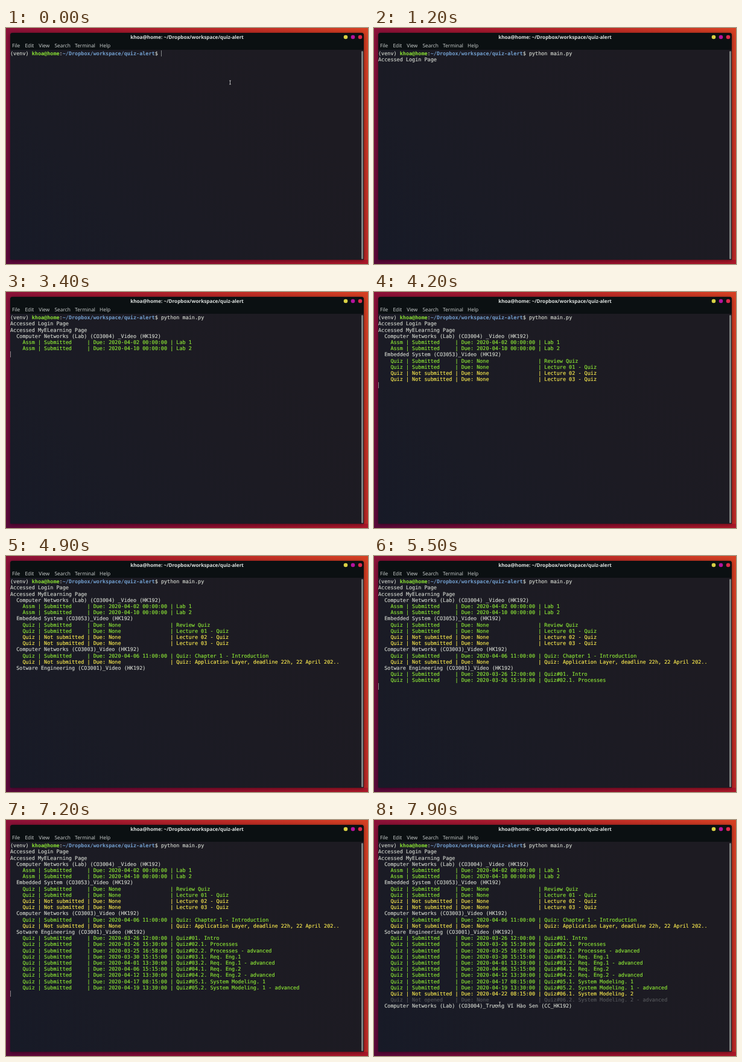
Recreate the animation shown at these times as an HTML page with a canvas. Size 600x390 px, loop 8000 ms.

```html
<!DOCTYPE html>
<html lang="en">
<head>
<meta charset="utf-8">
<title>Terminal</title>
<style>
  html, body { margin: 0; width: 100%; height: 100%; overflow: hidden; background: #7a0c38; }
  #stage { position: relative; width: 600px; height: 390px; overflow: hidden; text-rendering: geometricPrecision; }
  canvas { position: absolute; left: 0; top: 0; }
  .ui { position: absolute; white-space: pre; font-family: "Open Sans", "Noto Sans", sans-serif; line-height: 14px; }
  #title { left: 0; width: 600px; top: 8.6px; text-align: center; font-size: 8.17px; font-weight: 700; color: #dde1df; }
  .menu { top: 23px; font-size: 8.4px; color: #d0d5d4; }
  .row {
    position: absolute; left: 7px; white-space: pre; color: #d3d7cf;
    font: 8.476px/10.2px "DejaVu Sans Mono", monospace; -webkit-text-stroke: 0.15px;
  }
  .row b { color: #8ae234; -webkit-text-stroke: 0; }
  .row .path { color: #729fcf; }
  .ok { color: #8eea36; }
  .todo { color: #fcec4f; }
  .off { color: #54565a; }
  #caret { position: absolute; width: 1px; height: 10.2px; background: #85898a; }
</style>
</head>
<body>
<div id="stage">
  <canvas id="bg" width="600" height="390"></canvas>
  <div id="title" class="ui">khoa@home: ~/Dropbox/workspace/quiz-alert</div>
  <div id="caret"></div>
  <canvas id="mouse" width="600" height="390"></canvas>
</div>
<script>
const LOOP = 8000, FRAME = 100;
const LEFT = 7, TOP = 37.2, PITCH = 5.103, LINE = 10.2;
const PROMPT_COLS = 49, COMMAND = 'python main.py';
const TYPE_START = 100, TYPE_STEP = 50, ENTER = 900;
const stage = document.getElementById('stage');
const caret = document.getElementById('caret');

const text = (at, str) => ({ at, str, cls: '' });
const item = (at, cls, due, name, kind = 'Quiz') => {
  const state = { ok: 'Submitted', todo: 'Not submitted', off: 'Not opened' }[cls];
  const date = due ? '2020-' + due + ':00' : 'None';
  return { at, cls, str: `    ${kind} | ${state.padEnd(13)} | ${('Due: ' + date).padEnd(24)} | ${name}` };
};

const output = [
  text(1100, 'Accessed Login Page'),
  text(2300, 'Accessed MyELearning Page'),
  text(2800, '  Computer Networks (Lab) (CO3004) _Video (HK192)'),
  item(3000, 'ok', '04-02 00:00', 'Lab 1', 'Assm'),
  item(3200, 'ok', '04-10 00:00', 'Lab 2', 'Assm'),
  text(3500, '  Embedded System (CO3053)_Video (HK192)'),
  item(3700, 'ok', '', 'Review Quiz'),
  item(3800, 'ok', '', 'Lecture 01 - Quiz'),
  item(4000, 'todo', '', 'Lecture 02 - Quiz'),
  item(4100, 'todo', '', 'Lecture 03 - Quiz'),
  text(4300, '  Computer Networks (CO3003)_Video (HK192)'),
  item(4500, 'ok', '04-06 11:00', 'Quiz: Chapter 1 - Introduction'),
  item(4600, 'todo', '', 'Quiz: Application Layer, deadline 22h, 22 April 202..'),
  text(4800, '  Sotware Engineering (CO3001)_Video (HK192)'),
  item(5100, 'ok', '03-26 12:00', 'Quiz#01. Intro'),
  item(5400, 'ok', '03-26 15:30', 'Quiz#02.1. Processes'),
  item(5600, 'ok', '03-25 16:58', 'Quiz#02.2. Processes - advanced'),
  item(5800, 'ok', '03-30 15:15', 'Quiz#03.1. Req. Eng.1'),
  item(6000, 'ok', '04-01 13:30', 'Quiz#03.2. Req. Eng.1 - advanced'),
  item(6300, 'ok', '04-06 15:15', 'Quiz#04.1. Req. Eng.2'),
  item(6500, 'ok', '04-12 13:30', 'Quiz#04.2. Req. Eng.2 - advanced'),
  item(6800, 'ok', '04-17 08:15', 'Quiz#05.1. System Modeling. 1'),
  item(7000, 'ok', '04-19 13:30', 'Quiz#05.2. System Modeling. 1 - advanced'),
  item(7300, 'todo', '04-22 08:15', 'Quiz#06.1. System Modeling. 2'),
  item(7500, 'off', '', 'Quiz#06.2. System Modeling. 2 - advanced'),
  text(7800, '  Computer Networks (Lab) (CO3004)_Trương Vĩ Hào Sen (CC_HK192)')
];

function addText(cls, x, str) {
  const el = document.createElement('div');
  el.className = cls;
  el.style.left = x + 'px';
  el.textContent = str;
  stage.insertBefore(el, caret);
  return el;
}

function addRow(n, cls, str) {
  const el = addText('row ' + cls, LEFT, str);
  el.style.top = TOP + n * LINE + 'px';
  return el;
}

[['File', 10], ['Edit', 31.4], ['View', 54.2], ['Search', 80.5], ['Terminal', 114], ['Help', 155]]
  .forEach(([label, x]) => addText('ui menu', x, label));

const prompt = addRow(0, '', '');
prompt.innerHTML = '(venv) <b>khoa@home</b>:<b class="path">~/Dropbox/workspace/quiz-alert</b>$ <span></span>';
const typed = prompt.lastChild;
output.forEach((o, i) => { o.el = addRow(i + 1, o.cls, o.str); });

function gradient(c, box, stops) {
  const g = c.createLinearGradient(...box);
  stops.forEach((s, i) => g.addColorStop(i / (stops.length - 1), s));
  return g;
}

function drawDesktop() {
  const c = document.getElementById('bg').getContext('2d');
  const fill = (style, x, y, w, h, r = 0) => {
    c.fillStyle = style;
    c.beginPath();
    c.roundRect(x, y, w, h, r);
    c.fill();
  };
  fill(gradient(c, [0, 390, 600, 0], ['#5a0839', '#850f3a', '#a3182e', '#bf2c25', '#d64023']), 0, 0, 600, 390);
  fill(gradient(c, [0, 383, 600, 383], ['#5a0839', '#7c0a36', '#960f2c', '#ab1729']), 0, 383, 600, 7);

  c.shadowColor = 'rgba(0,0,0,.5)';
  c.shadowBlur = 6;
  c.shadowOffsetY = 1;
  fill('#1b1b23', 7, 8, 586, 375, [4, 4, 0, 0]);
  c.shadowColor = 'transparent';

  fill(gradient(c, [7, 383, 420, 36], ['#171a27', '#1a1b25', '#1c1b23', '#1d1b22']), 7, 36, 586, 347);
  fill('#0b1012', 7, 8, 586, 28, [4, 4, 0, 0]);
  fill('#7d8382', 589, 38, 3, 344, 1.5);

  [['#d8d044', 563], ['#b5139c', 575], ['#dc2a4c', 587]].forEach(([color, x]) => {
    c.fillStyle = color;
    c.beginPath();
    c.arc(x, 15, 3.3, 0, Math.PI * 2);
    c.fill();
  });
}

const pointer = document.getElementById('mouse').getContext('2d');
function drawPointer(x, y) {
  const beam = (color, width) => {
    pointer.strokeStyle = color;
    pointer.lineWidth = width;
    pointer.beginPath();
    pointer.moveTo(x - 1.5, y - 3);
    pointer.lineTo(x + 1.5, y - 3);
    pointer.moveTo(x, y - 3);
    pointer.lineTo(x, y + 3);
    pointer.moveTo(x - 1.5, y + 3);
    pointer.lineTo(x + 1.5, y + 3);
    pointer.stroke();
  };
  beam('#101014', 2);
  beam('#c4c6c8', 0.9);
}

function render(t) {
  const count = Math.max(0, Math.min(COMMAND.length, Math.floor((t - TYPE_START) / TYPE_STEP)));
  typed.textContent = COMMAND.slice(0, count);

  let shown = 0;
  for (const o of output) {
    const on = t >= o.at;
    o.el.style.visibility = on ? 'visible' : 'hidden';
    if (on) shown++;
  }

  const typing = t < ENTER;
  const blink = (t + 1250 - 430) % 1250 < 625;
  const col = typing ? PROMPT_COLS + count : 0;
  const line = typing ? 0 : shown + 1;
  caret.style.left = Math.round(LEFT - 0.4 + col * PITCH) + 'px';
  caret.style.top = TOP - 0.2 + line * LINE + 'px';
  caret.style.visibility = typing || blink ? 'visible' : 'hidden';

  pointer.clearRect(0, 0, 600, 390);
  if (t < TYPE_START + TYPE_STEP) drawPointer(371.5, 90);
  else if (t >= 7800) drawPointer(208.5, 304);
}

drawDesktop();
const start = performance.now();
function tick() {
  const t = (performance.now() - start) % LOOP;
  render(Math.floor(t / FRAME) * FRAME);
  requestAnimationFrame(tick);
}
tick();
</script>
</body>
</html>
```
